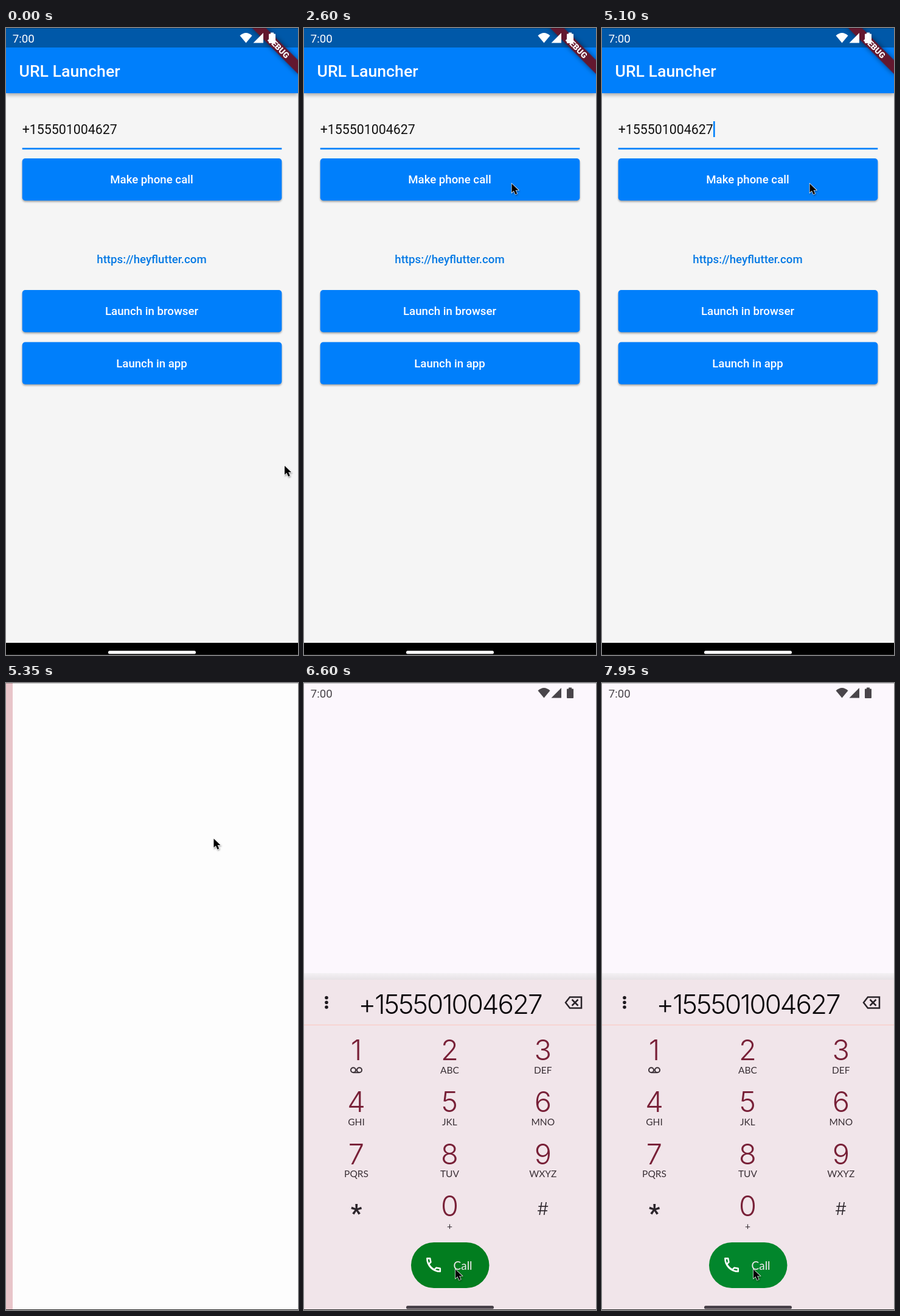
Write an HTML page that moves like this. It is 480 px wide and 1029 px high and loops after 8 s.

```html
<!DOCTYPE html>
<html lang="en">
<head>
<meta charset="utf-8">
<title>URL Launcher</title>
<style>
  html, body { margin: 0; width: 100%; height: 100%; overflow: hidden; background: #f5f5f5; }
  svg { display: block; width: 100%; height: 100%; }
  text { font-family: Roboto, sans-serif; font-size: 18.67px; }
  .mid { text-anchor: middle; }
  .medium { font-weight: 500; }
  .white { fill: #fff; }
  .bar { filter: drop-shadow(0 3px 3px rgba(0, 0, 0, .32)); }
  .button { fill: #007ffb; filter: drop-shadow(0 2px 1.5px rgba(0, 0, 0, .34)); }
  .banner { filter: drop-shadow(0 0 4px rgba(0, 0, 0, .5)); }
  .arrow { filter: drop-shadow(1px 2px 1px rgba(0, 0, 0, .35)); }
  .digit, .hash, .number { font-family: Inter, sans-serif; font-weight: 350; }
  .digit { font-size: 47px; fill: #782037; }
  .number { font-size: 44px; letter-spacing: -2px; fill: #0b080b; }
  .hash { font-size: 29px; fill: #2c252b; }
  .star { font-size: 41px; font-weight: 700; fill: #2c252b; }
  .letters, .call { font-family: Lato, sans-serif; }
  .letters { font-size: 15.5px; fill: #3a3036; }
  .call { font-size: 19px; fill: #f3eaf0; }
</style>
</head>
<body>
<svg viewBox="0 0 480 1029" preserveAspectRatio="none">
  <defs>
    <g id="status">
      <text x="10.7" y="23.5">7:00</text>
      <path d="M384.500 12.500Q394.500 3.500 404.500 12.500L394.500 24.500Z"/>
      <path d="M423 8V24.500H406.500Z"/>
      <path d="M435 7.500h5v2h2q1 0 1 1v13.500q0 1-1 1h-9q-1 0-1-1V10.500q0-1 1-1h2z"/>
    </g>
    <linearGradient id="edge" x2="0" y2="1">
      <stop stop-color="#f4f1f4"/>
      <stop offset="1" stop-color="#e5e0e4"/>
    </linearGradient>
  </defs>

  <rect width="480" height="1029" fill="#e8c5c9"/>

  <g id="home">
    <rect width="480" height="1029" fill="#f5f5f5"/>
    <rect class="bar" width="480" height="107" fill="#007ffb"/>
    <rect width="480" height="32" fill="#0058a8"/>
    <text class="medium white" x="21.5" y="80" style="font-size:26.67px">URL Launcher</text>
    <g transform="translate(480 0) rotate(45)">
      <rect class="banner" x="-54" y="37.3" width="108" height="16" fill="#63182f"/>
      <text class="mid white" y="50" style="font-size:13.6px;font-weight:900">DEBUG</text>
    </g>
    <use href="#status" fill="#fff"/>
    <text x="26.700" y="173.700" style="font-size:21.33px" fill="#111" class="phone"></text>
    <rect id="caret" x="183" y="153" width="2.600" height="26" fill="#007ffb"/>
    <rect x="26.700" y="196.700" width="426.600" height="2.700" fill="#007ffb"/>
    <g id="buttons"></g>
    <text class="mid medium" x="239.500" y="386" fill="#0579e4">https://heyflutter.com</text>
    <rect y="1009" width="480" height="20"/>
    <rect x="168" y="1022" width="144" height="5.300" rx="2.600" fill="#fff"/>
  </g>

  <rect id="splash" width="480" height="1029" fill="#fdfdfd"/>

  <g id="dial">
    <rect width="480" height="1029" fill="#fcf7fd"/>
    <use href="#status" fill="#49454a"/>
    <rect y="476" width="480" height="12" fill="url(#edge)"/>
    <rect y="487" width="480" height="542" fill="#f1e5ea"/>
    <rect y="560.500" width="480" height="1.500" fill="#f9cfcb"/>
    <path d="M37 516.500v0M37 524.200v0M37 532v0" stroke="#1f1a1f" stroke-width="5.600" stroke-linecap="round"/>
    <text class="mid number phone" x="240" y="543"></text>
    <path d="M437 515.500h19v18h-19l-7-9zM440.500 519.500l10 10M450.500 519.500l-10 10"
      fill="none" stroke="#2a242a" stroke-width="2.500"/>
    <g id="keys"></g>
    <path d="M81 639.300h10" stroke="#3a3036" stroke-width="2"/>
    <g fill="none" stroke="#3a3036" stroke-width="2">
      <circle cx="81" cy="635.300" r="4"/><circle cx="91" cy="635.300" r="4"/>
    </g>
    <rect id="call" x="176" y="918" width="128.500" height="75" rx="37.500"/>
    <path transform="translate(197 939) scale(1.34)" fill="none" stroke="#fff" stroke-width="1.900" stroke-linejoin="round"
      d="M4 4h3.600l.900 4.600-2.400 2.200a15 15 0 0 0 7 7l2.200-2.400 4.700.900V20A16 16 0 0 1 4 4z"/>
    <text class="call" x="245.500" y="963">Call</text>
    <rect x="168" y="1022" width="144" height="5.300" rx="2.600" fill="#49424a"/>
  </g>

  <rect width="480" height="1" fill="#000" opacity=".25"/>
  <rect y="1028" width="480" height="1" fill="#222"/>
  <g id="cursor">
    <path class="arrow" transform="translate(.5 1.5) scale(.86)" stroke="#fff" stroke-width="1.600" paint-order="stroke"
      d="M0 0V17l4-3.700 3 7 3.200-1.400-3-6.800h5.600z"/>
  </g>
</svg>

<script>
const $ = id => document.getElementById(id);
const LOOP = 8000, STEP = 50;
const SLIDE_AT = 5175, SLIDE_MS = 450, DIAL_AT = 5700;

document.querySelectorAll('.phone').forEach(el => el.textContent = '+155501004627');

$('buttons').innerHTML = [
  [214, 'Make phone call'], [430, 'Launch in browser'], [515.5, 'Launch in app']
].map(([y, label]) =>
  `<rect class="button" x="26.700" y="${y}" width="426.600" height="69.300" rx="5"/>
   <text class="mid medium white" x="239.500" y="${y + 41}">${label}</text>`).join('');

const letters = ['', 'ABC', 'DEF', 'GHI', 'JKL', 'MNO', 'PQRS', 'TUV', 'WXYZ', '', '+', ''];
const signs = { '*': ['star', 9], '#': ['hash', -2] };
$('keys').innerHTML = [...'123456789*0#'].map((key, i) => {
  const x = 86 + i % 3 * 153.4, y = 619 + Math.floor(i / 3) * 85.4;
  const [style, dy] = signs[key] || ['digit', 0];
  return `<text class="mid ${style}" x="${x}" y="${y + dy}">${key}</text>
    <text class="mid letters" x="${x}" y="${y + 21.5}">${letters[i]}</text>`;
}).join('');

// time, x, y of the pointer tip
const path = [
  [0, 457.5, 717], [550, 457.5, 717], [700, 455, 699], [850, 448, 651], [1150, 398, 470],
  [1400, 354, 338], [1550, 344, 278], [1700, 341, 254], [5950, 341, 254], [6050, 333, 310],
  [6250, 283, 690], [6400, 254, 915], [6500, 248.5, 961], [LOOP, 248.5, 961]
];

const clamp = v => Math.max(0, Math.min(1, v));

function pointAt(t) {
  const i = path.findIndex(p => p[0] > t);
  const a = path[i - 1], b = path[i];
  const k = (t - a[0]) / (b[0] - a[0]);
  return [a[1] + (b[1] - a[1]) * k, a[2] + (b[2] - a[2]) * k];
}

const show = (id, on) => $(id).setAttribute('visibility', on ? 'visible' : 'hidden');
const move = (id, x, y = 0) => $(id).setAttribute('transform', `translate(${x} ${y})`);

function draw(t) {
  const slide = 1 - (1 - clamp((t - SLIDE_AT) / SLIDE_MS)) ** 3;
  const fade = clamp((t - SLIDE_AT - 40) / 85);
  move('home', -48 * slide);
  show('home', fade < 1);
  move('splash', Math.round(48 * (1 - slide)));
  $('splash').setAttribute('opacity', fade);
  show('dial', t >= DIAL_AT);
  show('caret', fade < 1 && t % 1050 >= 525);
  const glow = clamp((t - 6700) / 300);
  $('call').setAttribute('fill', `rgb(2 ${125 + 9 * glow} ${31 + 13 * glow})`);
  move('cursor', ...pointAt(t));
}

const start = performance.now();
function tick() {
  const t = (performance.now() - start) % LOOP;
  draw(Math.floor(t / STEP) * STEP);
  requestAnimationFrame(tick);
}
tick();
</script>
</body>
</html>
```
